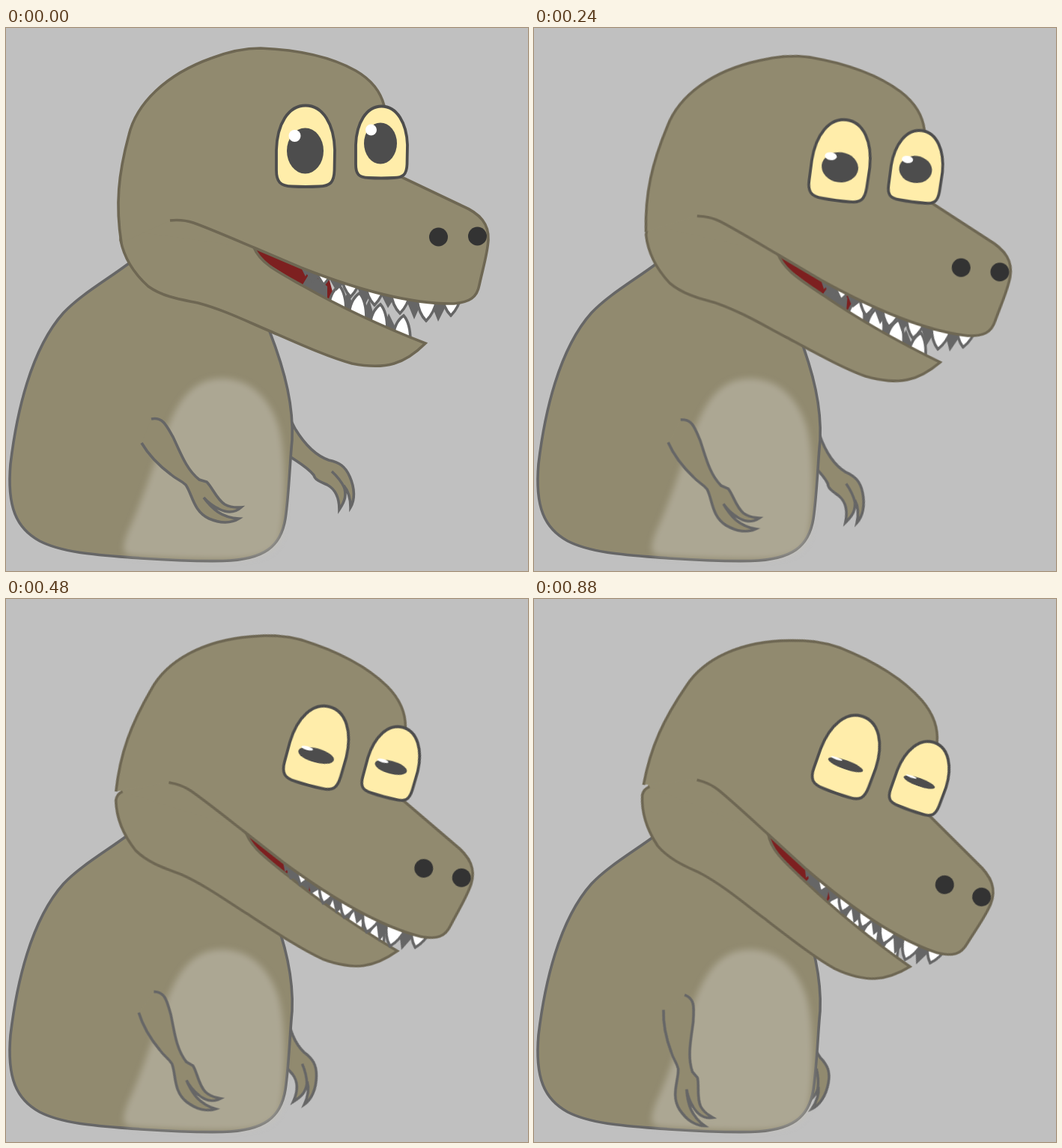
An HTML page for the animation above (960 ms loop, 697 by 725 pixels).

```html
<!DOCTYPE html>
<html lang="en">
<head>
<meta charset="utf-8">
<title>Nodding dinosaur</title>
<style>
  html, body { margin: 0; width: 100%; height: 100%; overflow: hidden; background: #c0c0c0; }
  svg { display: block; width: 697px; height: 725px; }

  .skin { fill: #918a6f; }
  .body, .arm { fill: #918a6f; stroke: #666; stroke-width: 3.6; stroke-linejoin: miter; }
  .face { fill: #918a6f; stroke: #6e6753; stroke-width: 3.6; }
  .eye { fill: #ffedaa; stroke: #4d4d4d; stroke-width: 3.8; }
  .iris { fill: #4d4d4d; }
  .shine { fill: #fff; }
  .nose { fill: #333; }
  .teeth { fill: #fff; stroke: #666; stroke-width: 3.6; }
  .gum { fill: #666; }

  /* Two straight stretches, each held on 80 ms steps */
  .turn { --mid-size: 1; --end-size: 1; animation: turn .96s steps(6, end) infinite; }
  @keyframes turn {
    0% { transform: rotate(0deg) scale(1); }
    50% { transform: rotate(var(--mid)) scale(var(--mid-size)); }
    100% { transform: rotate(var(--end)) scale(var(--end-size)); }
  }
  .head { transform-origin: 263.5px 245px; --mid: 15.1deg; --end: 20.3deg; }
  .jaw { transform-origin: 233.9px 233.7px; --mid: 9.43deg; --end: 14.85deg; --mid-size: .992; --end-size: .987; }
  .near { transform-origin: 186.3px 537.4px; --mid: 13.5deg; --end: 36.3deg; }
  .far { transform-origin: 349px 515px; --mid: 24.4deg; --end: 36deg; }

  .squint { animation: squint .96s steps(7, end) infinite; }
  @keyframes squint {
    0% { transform: scaleY(1); }
    58.3333%, 100% { transform: scaleY(.2); }
  }
  .left { transform-origin: 399.5px 174px; }
  .right { transform-origin: 500px 163px; }
</style>
</head>
<body>
<svg viewBox="0 0 697 725">
  <defs>
    <filter id="soft" x="-20%" y="-20%" width="140%" height="140%"><feGaussianBlur stdDeviation="4.5"/></filter>
    <path id="fang" d="M-12-28Q-10-10 0 0Q11-11 14-28z"/>
    <path id="tusk" d="M-14 30Q-13 9 0 0Q9 10 9 34z"/>
  </defs>

  <g class="turn far">
    <path class="arm" d="M368 505C378 517 382 528 386 535C397 553 411 570 431 577C445 580 453 585 459 599C466 615 466 630 460 640
      C460 628 457 618 451 611C455 624 453 631 445 643C445 628 440 616 429 610C420 606 412 603 411 597C402 586 390 580 376 570"/>
    <path class="arm" style="fill:none" d="M435 592Q446 602 452 614"/>
  </g>

  <path class="body" d="M190 296L163 315C132 338 100 356 77 380C33 429 14 515 6 582C1 640 14 668 45 685C78 702 130 704 180 708
    C225 711 260 712 290 711.5C345 710 367 692 373 655C378 620 379 580 382 550C384 507 374 462 352 405L330 330z"/>
  <path d="M288 468C328 468 353 497 364 532C374 567 374 640 367 678C361 700 340 709 300 709C250 710 200 707 168 705
    C154 702 155 693 163 672C181 633 191 600 207 558C222 512 242 468 288 468z" fill="#c8c4b8" opacity=".5" filter="url(#soft)"/>

  <g class="turn near">
    <path class="arm" d="M194 522C209 519 214 530 223 546C233 567 241 590 258 603L268 606C276 614 281 629 292 636Q301 641 314 640
      C305 648 294 647 284 642Q273 637 264 627C275 642 288 654 311 655C300 662 285 661 271 655C250 645 249 623 240 610
      C234 604 228 603 220 596C204 584 191 571 181 554"/>
  </g>

  <g class="turn jaw">
    <path d="M331 293L425 312L436 352L432 367L396 344L345 312z" fill="#7d2020"/>
    <path class="gum" d="M394 346L406 326L429 345V364zM446 374L457 351L466 380zM474 386L485 362L494 394zM504 400L511 381L522 404z"/>
    <g class="teeth">
      <use href="#tusk" x="445" y="344"/>
      <use href="#tusk" x="472" y="354"/>
      <use href="#tusk" x="500" y="369"/>
      <use href="#tusk" x="531" y="384"/>
    </g>
    <path class="skin" d="M157 264L230 215L331 293L300 350L190 330L157 284z"/>
    <path class="face" d="M160 270Q153 274 153 283C157 304 169 326 190 345C211 360 237 363 256 367C290 376 320 391 353 405
      C392 422 432 440 462 448C508 457 533 448 560 421C506 400 447 373 396 344C366 327 340 315 331 293"/>
  </g>

  <g class="turn head">
    <path class="gum" d="M395 318L409 340L422 330zM430 332L441 351L452 340zM468 345L480 368L490 350zM500 354L510 374L520 358zM534 362L545 389L556 364zM566 364L577 392L590 366z"/>
    <g class="teeth">
      <path d="M395 318L400 328L405 320zM412 324L424 343L436 328z"/>
      <use href="#fang" x="460" y="359"/>
      <use href="#fang" x="492" y="370"/>
      <use href="#fang" x="526" y="381"/>
      <use href="#fang" x="561" y="391"/>
      <use href="#fang" x="594" y="384"/>
    </g>
    <path class="face" d="M154 287C146 236 150 195 164 143C174 101 213 62 275 40C296 32 318 27 340 27C390 29 435 39 467 57
      C486 68 500 84 505 104L528 199L608 237C634 248 645 262 644 283C643 301 637 320 632 343C629 360 619 366 598 368
      C530 369 445 340 394 320L333 294C300 280 270 267 250 260C238 256 229 256 219 257"/>

    <path class="eye" d="M400 103.500C423 103.500 438 128 439 163L438.500 190C438 206 433 211 418 211.500Q400 212.500 382 211.500
      C366 211 361 205 361 190L361 163C362 128 377 103.500 400 103.500z"/>
    <g class="squint left">
      <ellipse class="iris" cx="399.5" cy="164" rx="24.5" ry="30.5"/>
      <circle class="shine" cx="385.5" cy="144" r="8"/>
    </g>

    <path class="eye" d="M501.500 104.500C522 104.500 535 127 536 156L535.500 182C535 196 530 199.500 518 200Q501 201 484 200
      C471 199.500 467 195 467 182L467 156C468 127 481 104.500 501.500 104.500z"/>
    <g class="squint right">
      <ellipse class="iris" cx="500" cy="154" rx="22" ry="27.5"/>
      <circle class="shine" cx="487.500" cy="136" r="7.500"/>
    </g>

    <circle class="nose" cx="577.500" cy="279" r="12.500"/>
    <circle class="nose" cx="629.500" cy="278" r="12.500"/>
  </g>
</svg>
</body>
</html>
```
